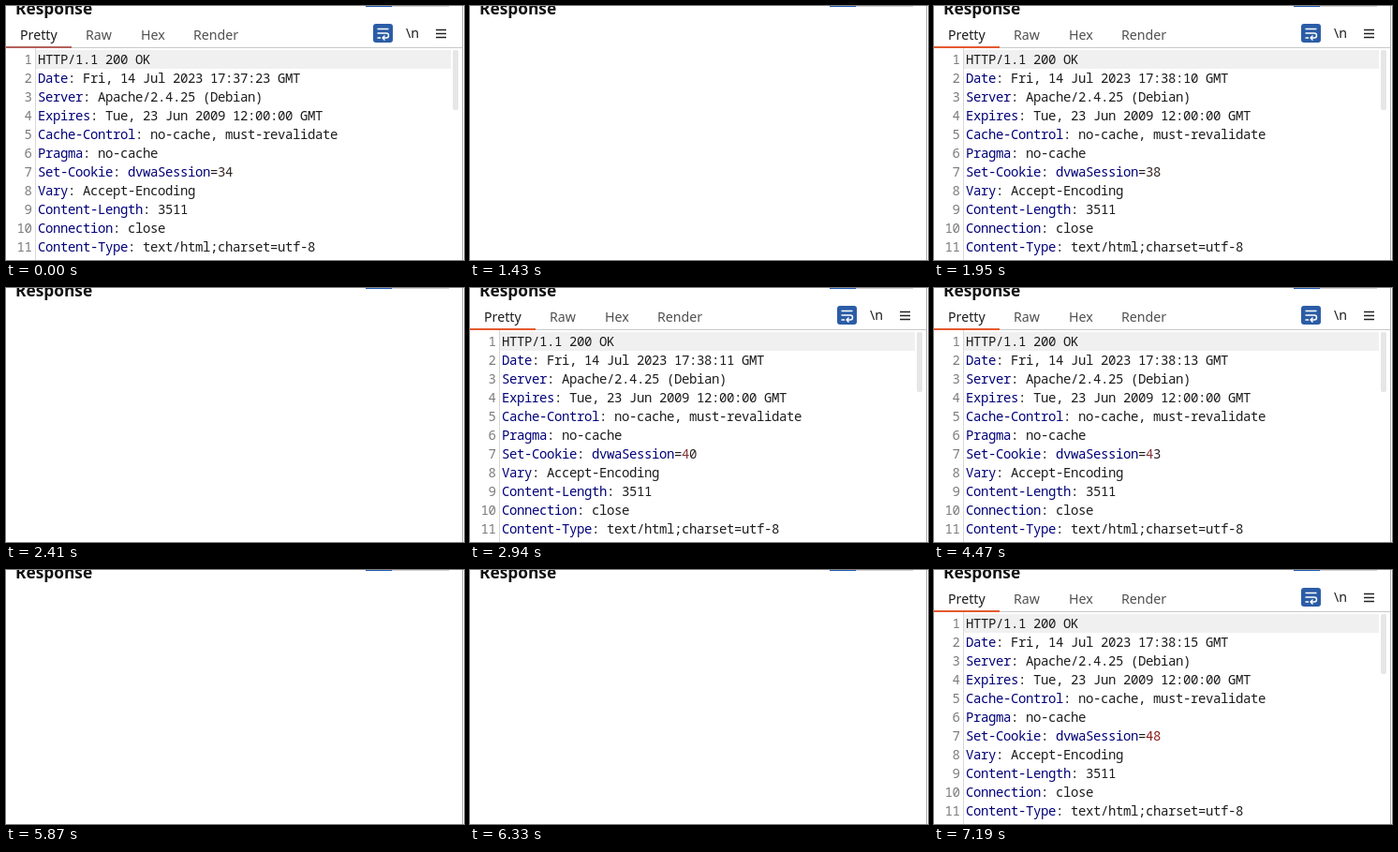
An HTML page that plays this animation: 489 by 271 pixels, repeating every 8 s.

```html
<!DOCTYPE html>
<html lang="en">
<head>
<meta charset="utf-8">
<title>Response viewer</title>
<style>
  html, body { margin: 0; width: 100%; height: 100%; overflow: hidden; background: #fff; }
  svg { display: block; }
  text { font: 14.2px "Noto Sans", sans-serif; fill: #505050; white-space: pre; }
  .title { font-size: 17.33px; font-weight: bold; fill: #111; }
  .dark { fill: #1c1c1c; }
  .code text { font: 14px "Noto Sans Mono", monospace; letter-spacing: -.4px; fill: #1c1c1c; }
  .code .num { fill: #7c7c7c; }
  .name { fill: #000078; }
</style>
</head>
<body>
<svg width="489" height="271" viewBox="0 0 489 271">
  <rect width="489" height="271" fill="#fff"/>
  <text class="title" x="10" y="9">Response</text>
  <path d="M384 .5h28" stroke="#2058b0"/>
  <path d="M412 .5h61" stroke="#d2d2d2"/>
  <path d="M487.5 0v271" stroke="#b0b0b0"/>
  <g id="panel">
    <text class="dark" x="15" y="36">Pretty</text>
    <text x="85" y="36">Raw</text>
    <text x="144" y="36">Hex</text>
    <text x="200" y="36">Render</text>
    <path d="M0 44.5h487" stroke="#c9c9c9"/>
    <rect id="underline" y="43" width="70" height="2"/>
    <rect x="392" y="19" width="21" height="20" rx="3" fill="#2b5ca6"/>
    <path d="M396.500 24.500h12M396.500 29h9.500a2.500 2.500 0 0 1 0 5h-3M396.500 34h3.500M404.500 31.500l-2.500 2.500l2.500 2.500"
      fill="none" stroke="#fff" stroke-width="1.4"/>
    <text class="dark" x="427" y="34" font-weight="500">\n</text>
    <path d="M459 25.500h11M459 29.500h11M459 33.500h11" stroke="#222" stroke-width="1.5"/>
    <rect x="32" y="47" width="443" height="20" fill="#f0f0f0"/>
    <path d="M31.500 45v226" stroke="#d8d8d8"/>
    <rect x="477" y="47" width="6" height="64" rx="2" fill="#e6e6e6"/>
    <g class="code" id="code"></g>
  </g>
</svg>
<script>
const LOOP = 8000;
const $ = id => document.getElementById(id);

const headers = [
  'HTTP/1.1 200 OK',
  'Date: Fri, 14 Jul 2023 <tspan id="clock"></tspan> GMT',
  'Server: Apache/2.4.25 (Debian)',
  'Expires: Tue, 23 Jun 2009 12:00:00 GMT',
  'Cache-Control: no-cache, must-revalidate',
  'Pragma: no-cache',
  'Set-Cookie: <tspan class="name">dvwaSession</tspan>=<tspan id="tens"></tspan><tspan id="units"></tspan>',
  'Vary: Accept-Encoding',
  'Content-Length: 3511',
  'Connection: close',
  'Content-Type: text/html;charset=utf-8'
];
$('code').innerHTML = headers.map((line, i) => {
  const y = 62 + 20 * i;
  const number = String(i + 1).padStart(2);
  const body = line.replace(/^([\w-]+)(?=: )/, '<tspan class="name">$1</tspan>');
  return `<text class="num" x="11.500" y="${y}">${number}</text><text x="34" y="${y}">${body}</text>`;
}).join('');

// Each response raises the session by one; the server clock ticks on some of them.
const responses = [500, 1030, 1500, 1950, 2480, 2940, 3480, 3930, 4470, 4990, 5390, 5930, 6390, 6790];
const ticks = [500, 1500, 2480, 3480, 4470, 5390, 6390];
const reloads = [[1430, 1500], [2410, 2480], [3410, 3480], [5870, 5930], [6330, 6390]];
const passed = (times, t) => times.filter(at => t >= at).length;

function draw(t) {
  const session = String(34 + passed(responses, t));
  const tick = passed(ticks, t);
  const red = t >= 6990;
  $('panel').style.display = reloads.some(([a, b]) => t >= a && t < b) ? 'none' : '';
  $('clock').textContent = tick ? '17:38:' + String(8 + tick).padStart(2, '0') : '17:37:23';
  $('tens').textContent = session[0];
  $('units').textContent = session[1];
  $('tens').style.fill = red ? '#8c1c1c' : session[0] === '4' ? '#803438' : '#3c2626';
  $('units').style.fill = red ? '#8c1c1c' : '#302424';
  $('underline').style.fill = t < 1430 ? '#b5605a' : '#e4592e';
}

const start = performance.now();
function frame() {
  draw((performance.now() - start) % LOOP);
  requestAnimationFrame(frame);
}
frame();
</script>
</body>
</html>
```
